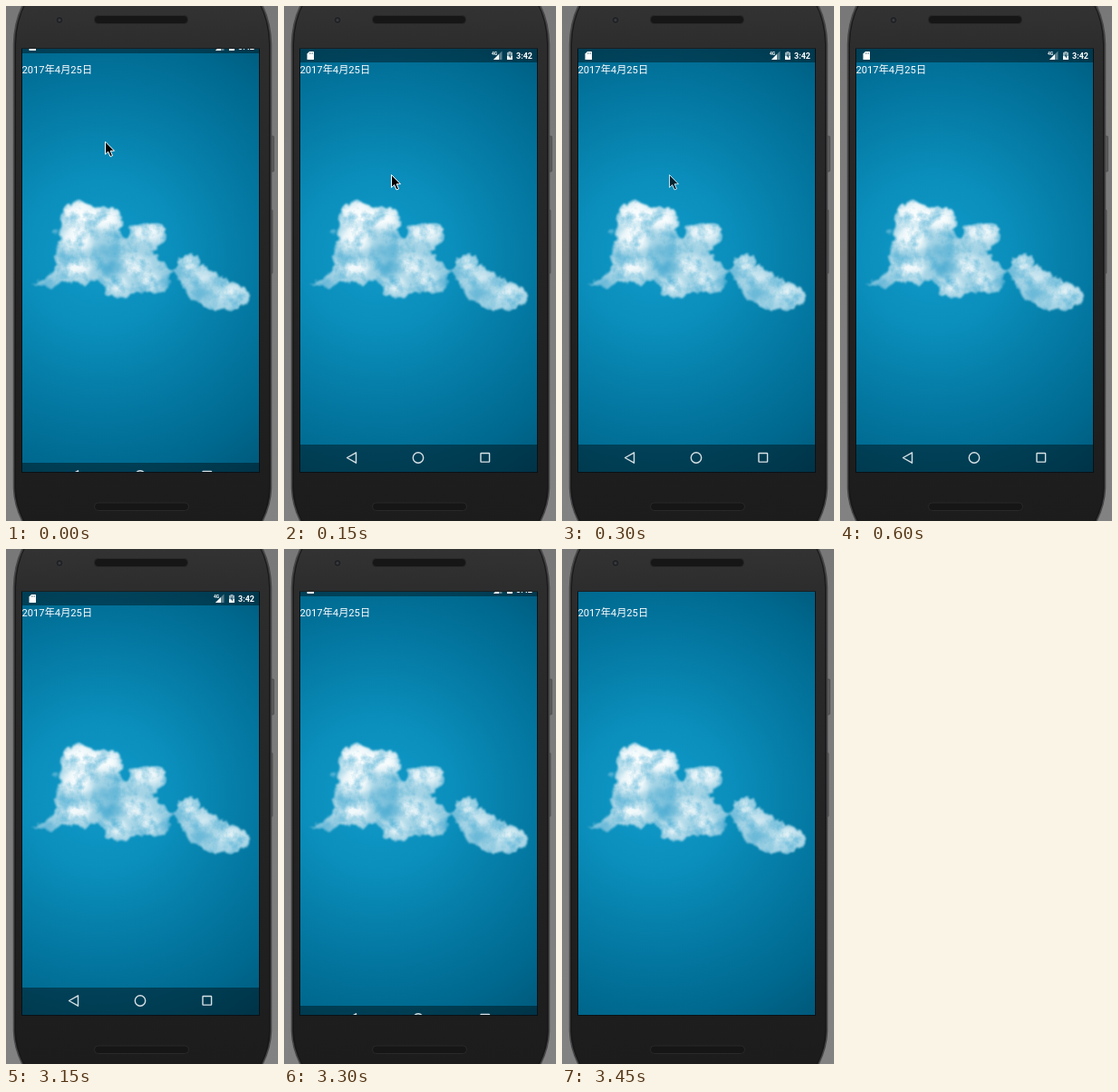
Recreate the animation shown at these times as an HTML page. Size 300x566 px, loop 4950 ms.

```html
<!DOCTYPE html>
<html lang="zh">
<head>
<meta charset="utf-8">
<title>Immersive screen</title>
<style>
  html, body { margin: 0; width: 100%; height: 100%; overflow: hidden; background: #7c7c7c; }
  svg { display: block; width: 100%; height: 100%; }
  text { fill: #fff; font-family: Roboto, "Noto Sans CJK SC", "Noto Sans CJK JP", "Noto Sans CJK", sans-serif; }
</style>
</head>
<body>
<svg viewBox="0 0 300 566">
  <defs>
    <linearGradient id="desk" x2="0" y2="1"><stop stop-color="#787878"/><stop offset="1" stop-color="#828282"/></linearGradient>
    <linearGradient id="body" x2="0" y2="1">
      <stop stop-color="#333334"/><stop offset=".08" stop-color="#2d2d2e"/>
      <stop offset=".5" stop-color="#242425"/><stop offset="1" stop-color="#1c1c1c"/>
    </linearGradient>
    <radialGradient id="sky" gradientUnits="userSpaceOnUse" cx="104" cy="271" r="300">
      <stop stop-color="#119bca"/><stop offset=".3" stop-color="#0a8dba"/>
      <stop offset=".55" stop-color="#047aa4"/><stop offset=".8" stop-color="#00698f"/>
      <stop offset="1" stop-color="#00587a"/>
    </radialGradient>
    <clipPath id="screen"><path d="M18 47H279V512H18Z"/></clipPath>
    <filter id="soft" x="-50%" y="-50%" width="200%" height="200%"><feGaussianBlur stdDeviation="4"/></filter>
    <!-- ragged edge plus faint blue shade -->
    <filter id="fluff" x="-10%" y="-10%" width="120%" height="120%" color-interpolation-filters="sRGB">
      <feTurbulence type="fractalNoise" baseFrequency=".13" numOctaves="3" seed="8" result="grain"/>
      <feDisplacementMap in="SourceGraphic" in2="grain" scale="8" xChannelSelector="R" yChannelSelector="G"/>
      <feGaussianBlur stdDeviation=".8" result="cloud"/>
      <feTurbulence type="fractalNoise" baseFrequency=".07" numOctaves="4" seed="3"/>
      <feColorMatrix values="0 0 0 0 .3  0 0 0 0 .68  0 0 0 0 .83  1.6 0 0 0 -.65"/>
      <feComposite in2="cloud" operator="in" result="shade"/>
      <feMerge><feMergeNode in="cloud"/><feMergeNode in="shade"/></feMerge>
    </filter>
    <path id="bigCloud" d="M63 225Q65 216 72 219L79 212Q85 214 87 219Q95 217 98 222Q107 219 114 221Q127 223 128 235
      Q130 243 122 247Q127 253 131 256L136 254Q132 248 139 243Q148 237 156 240Q167 237 174 244Q180 253 172 260
      Q166 267 160 270Q168 274 170 282Q180 285 184 291Q180 300 180 307Q174 316 164 315Q153 314 146 313
      Q137 319 126 320Q114 321 110 314Q112 306 104 304Q94 297 90 304Q83 309 76 304Q66 299 60 304Q55 311 45 308
      L29 306Q42 302 49 294Q57 290 55 281Q50 274 58 268Q54 261 61 255Q57 246 62 239Q58 232 63 225Z"/>
    <path id="smallCloud" d="M184 291Q189 286 188 281Q190 277 196 277Q200 270 206 273Q214 276 213 285Q221 285 225 291
      Q234 292 235 299Q243 298 248 303Q257 303 260 309Q269 312 268 321Q264 329 258 330Q249 337 240 332
      Q231 336 222 333Q216 327 211 324Q202 323 200 316Q195 310 195 303Q187 301 184 291Z"/>
    <clipPath id="clouds"><use href="#bigCloud"/><use href="#smallCloud"/></clipPath>
  </defs>

  <rect width="300" height="566" fill="url(#desk)"/>
  <g fill="#5c5c5c" stroke="#4a4a4a" stroke-width=".7">
    <rect x="291" y="143" width="4.500" height="39" rx="1"/>
    <rect x="290" y="224" width="4" height="70" rx="1"/>
  </g>
  <path d="M20-4Q9 16 8.500 42V530Q9 550 20 570H281Q292 550 292.500 530V42Q292 16 281-4Z"
    fill="url(#body)" stroke="#48484a" stroke-width="1.500"/>
  <path d="M22-4Q11 16 10.500 42V530Q11 550 22 570M279-4Q290 16 290.500 42V530Q290 550 279 570" fill="none" stroke="#171717"/>
  <circle cx="59" cy="15.500" r="4" fill="#202124" stroke="#3b3b3d" stroke-width=".7"/>
  <circle cx="59" cy="15.500" r="1.500" fill="#3a3c41"/>
  <g fill="#161616" stroke="#292929">
    <rect x="97.500" y="10.500" width="103" height="9" rx="4"/>
    <rect x="97.500" y="546" width="104" height="8.500" rx="4"/>
  </g>
  <rect x="17" y="46.500" width="263" height="466.500" fill="#0a1115"/>

  <g clip-path="url(#screen)">
    <rect x="18" y="47" width="261" height="465" fill="url(#sky)"/>
    <g filter="url(#fluff)">
      <g fill="#a3d3e5"><use href="#bigCloud"/><use href="#smallCloud"/><circle cx="54" cy="248" r="2.500" opacity=".5"/></g>
      <g clip-path="url(#clouds)"><g fill="#f8fcfd" filter="url(#soft)">
        <ellipse cx="82" cy="230" rx="20" ry="15"/>
        <ellipse cx="111" cy="234" rx="16" ry="12"/>
        <ellipse cx="79" cy="256" rx="17" ry="13"/>
        <ellipse cx="78" cy="288" rx="15" ry="9"/>
        <ellipse cx="156" cy="249" rx="17" ry="9"/>
        <ellipse cx="143" cy="285" rx="14" ry="9"/>
        <ellipse cx="124" cy="306" rx="10" ry="8"/>
        <ellipse cx="160" cy="302" rx="11" ry="7"/>
        <ellipse cx="202" cy="284" rx="9" ry="9" opacity=".8"/>
        <ellipse cx="217" cy="298" rx="10" ry="6" opacity=".7"/>
        <ellipse cx="248" cy="315" rx="14" ry="8" opacity=".8"/>
      </g>
      <g fill="#3fa5ce" filter="url(#soft)" opacity=".8">
        <ellipse cx="115" cy="287" rx="12" ry="9"/>
        <ellipse cx="111" cy="269" rx="15" ry="4"/>
        <ellipse cx="44" cy="307" rx="15" ry="4"/>
        <ellipse cx="177" cy="305" rx="6" ry="9"/>
        <ellipse cx="213" cy="317" rx="11" ry="5"/>
        <ellipse cx="188" cy="294" rx="5" ry="7"/>
      </g></g>
    </g>
    <text x="17.500" y="74" font-size="11.200">2017年4月25日</text>

    <g id="statusBar">
      <rect x="18" y="47" width="261" height="15" opacity=".4"/>
      <path d="M28 50H32.500Q33 50 33 50.500V58.500Q33 59 32.500 59H26Q25.500 59 25.500 58.500V52.500Z" fill="#fff"/>
      <path d="M28.500 51V53M30 51V53M31.500 51V53" stroke="#5a8291" stroke-width=".6"/>
      <text x="229" y="54" font-size="5" font-weight="700">4G</text>
      <path d="M231 59L240.500 49.500V59Z" fill="#fff" opacity=".35"/>
      <path d="M231 59L237 53V59Z" fill="#fff"/>
      <path d="M246 51H247.500V50H250.500V51H252V59H246Z" fill="#fff" opacity=".6"/>
      <path d="M246 55H252V59H246Z" fill="#fff"/>
      <path d="M249.500 51.500L247.500 55.500H249V58L250.800 54.500H249.500Z" fill="#15516a"/>
      <text x="256" y="58" font-size="9" font-weight="700">3:42</text>
    </g>
    <g id="navBar">
      <rect x="18" y="482" width="261" height="30" opacity=".42"/>
      <g fill="none" stroke="#d7e1e5" stroke-width="1.400" stroke-linejoin="round">
        <path d="M69.500 496.500L79.500 490.800V502.200Z"/>
        <circle cx="148" cy="496.500" r="5.700"/>
        <rect x="217" y="491.500" width="9.600" height="9.600" rx=".5"/>
      </g>
    </g>
    <path id="pointer" d="M.5.500V14.500L3.700 11.600L6 17L8.500 16L6.200 10.700H10.500Z" stroke="#fff"/>
  </g>
</svg>
<script>
  const LOOP = 4950;
  // Each step holds until the next; reveal is how far the system bars are in.
  const steps = [
    { at: 0, reveal: 1 / 3, pointer: [109, 148.5, 1] },
    { at: 150, reveal: 1, pointer: [118, 185, 1] },
    { at: 300, reveal: 1, pointer: [118, 185, 0.75] },
    { at: 450, reveal: 1, pointer: [118, 185, 0.35] },
    { at: 600, reveal: 1 },
    { at: 3300, reveal: 1 / 3 },
    { at: 3450, reveal: 0 }
  ];
  const [statusBar, navBar, pointer] =
    ["statusBar", "navBar", "pointer"].map(id => document.getElementById(id));
  const place = (el, x, y) => el.setAttribute("transform", `translate(${x} ${y})`);
  const start = performance.now();
  let shown;

  function draw() {
    const time = Math.max(0, performance.now() - start) % LOOP;
    const step = steps.findLast(s => s.at <= time);
    if (step !== shown) {
      shown = step;
      const hidden = 1 - step.reveal;
      place(statusBar, 0, -15 * hidden);
      place(navBar, 0, 30 * hidden);
      const [x, y, opacity] = step.pointer || [0, 0, 0];
      place(pointer, x, y);
      pointer.setAttribute("opacity", opacity);
    }
    requestAnimationFrame(draw);
  }
  draw();
</script>
</body>
</html>
```
